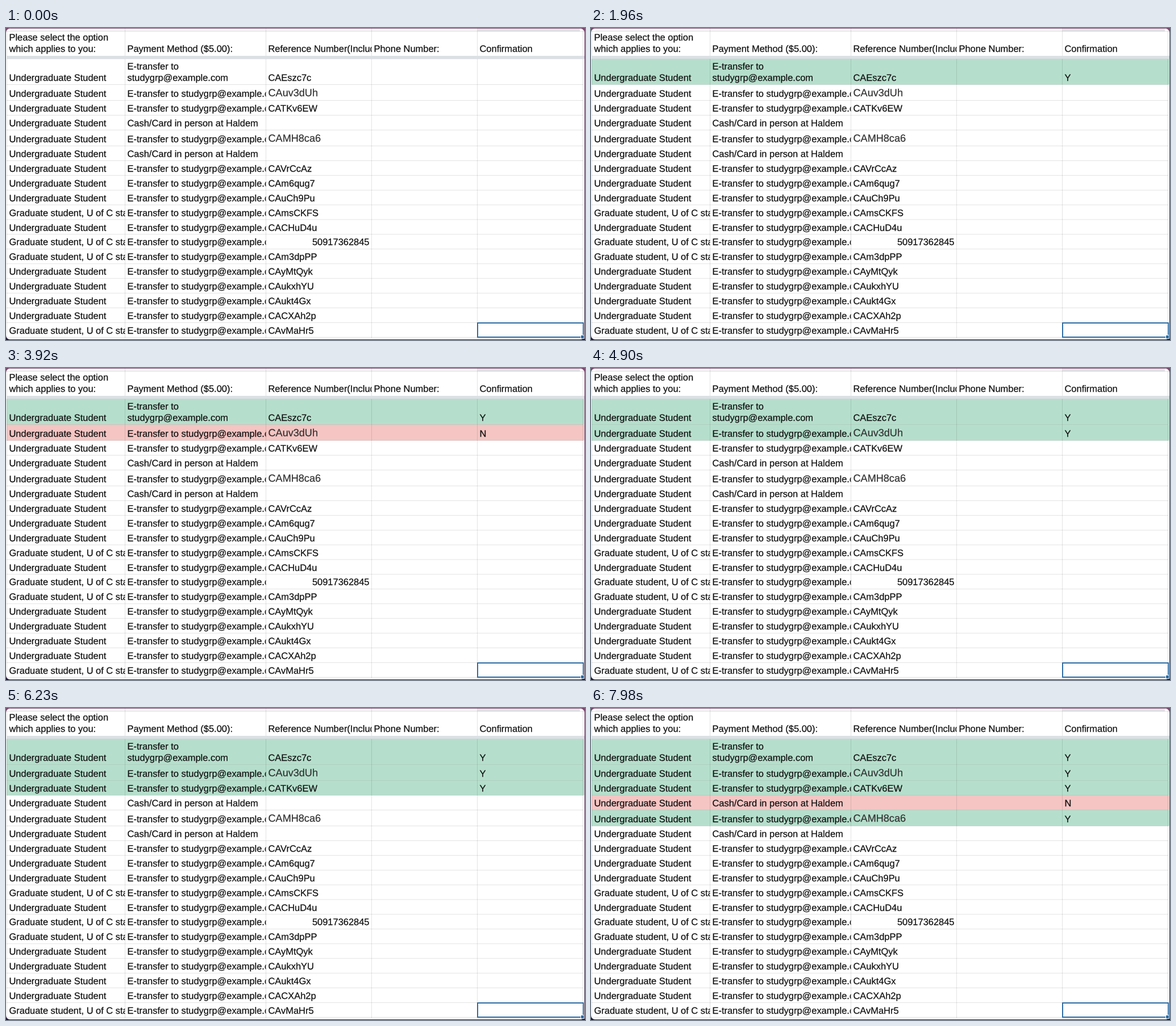
An HTML page that plays this animation: 1019 by 549 pixels, repeating every 8 s.

```html
<!DOCTYPE html>
<html lang="en">
<head>
<meta charset="utf-8">
<title>Payment sheet</title>
<style>
  html, body { margin: 0; width: 100%; height: 100%; overflow: hidden; background: #fff; }
  svg { display: block; }
  text {
    font: 16.45px "Liberation Sans", Arial, sans-serif;
    text-rendering: geometricPrecision;
    fill: #111;
    stroke: #111;
    stroke-width: .25px;
    white-space: pre;
  }
  .big { font-size: 18.1px; fill: #333; stroke: #333; }
</style>
</head>
<body>
<svg id="stage" width="1019" height="549" viewBox="0 0 1019 549"></svg>
<script>
const LOOP = 8000;
const PINK = '#f4c5c3', GREEN = '#b5dfcc', BLUE = '#2d6ba3';
const cols = [1.5, 209.5, 457.5, 643.5, 829.5, 1015.5];
const tops = [54, 99.5, 127.5, 153.5, 179.5, 207.5];
for (let i = 0; i <= 12; i++) tops.push(233.5 + i * 25.9);

const mail = 'studygrp@example.com';
const refs = ['CAEszc7c', 'CAuv3dUh', 'CATKv6EW', '', 'CAMH8ca6', '', 'CAVrCcAz', 'CAm6qug7', 'CAuCh9Pu',
  'CAmsCKFS', 'CACHuD4u', '50917362845', 'CAm3dpPP', 'CAyMtQyk', 'CAukxhYU', 'CAukt4Gx', 'CACXAh2p', 'CAvMaHr5'];
const graduates = [9, 11, 12, 17];
const bigRefs = [1, 4];

// [time, row, answer]
const answers = [
  [1120, 0, 'N'], [1750, 0, 'Y'], [2940, 1, 'N'], [4060, 1, 'Y'],
  [5390, 2, 'N'], [6020, 2, 'Y'], [6720, 3, 'N'], [7840, 4, 'Y']
];

const rect = (x, y, w, h, fill, more = '') =>
  `<rect x="${x}" y="${y}" width="${w}" height="${h}" fill="${fill}" ${more}/>`;
const path = (d, stroke, more = '') => `<path d="${d}" fill="none" stroke="${stroke}" ${more}/>`;

// Text in a cell, cut off at the right edge of its column
function cell(col, y, text, attrs = '') {
  const x = cols[col], w = cols[col + 1] - x;
  return `<svg x="${x}" y="0" width="${w}" height="549"><text x="4" y="${y}" ${attrs}>${text}</text></svg>`;
}

function header() {
  return cell(0, 22.2, 'Please select the option') + cell(0, 42.2, 'which applies to you:') +
    ['Payment Method ($5.00):', 'Reference Number(Include', 'Phone Number:', 'Confirmation']
      .map((title, i) => cell(i + 1, 42.2, title)).join('');
}

function row(ref, i) {
  const y = tops[i + 1] - 6.5;
  const who = graduates.includes(i) ? 'Graduate student, U of C staff' : 'Undergraduate Student';
  let pay = cell(1, y, ref ? 'E-transfer to ' + mail : 'Cash/Card in person at Haldem');
  if (i === 0) pay = cell(1, y - 20, 'E-transfer to') + cell(1, y, mail);
  const number = /^\d+$/.test(ref);
  const code = number
    ? `<text x="639.5" y="${y}" text-anchor="end">${ref}</text>`
    : bigRefs.includes(i) ? cell(2, y - 1, ref, 'class="big"') : cell(2, y, ref);
  return cell(0, y, who) + pay + code + cell(4, y, '', `id="mark${i}"`);
}

const fillRow = i => rect(1, tops[i], 1016.5, tops[i + 1] - tops[i], 'none', `id="fill${i}"`);

const lines = tops.map(y => `M1 ${y}H1016`).join('') + cols.map(x => `M${x} 1V547`).join('');
const stage = document.getElementById('stage');
stage.innerHTML = `
  <linearGradient id="desk" x2="0" y2="1">
    <stop stop-color="#7d4a70"/><stop offset="1" stop-color="#201634"/>
  </linearGradient>` +
  rect(0, 0, 1019, 549, 'url(#desk)') +
  rect(0, 1, 1018, 547, '#fff', 'rx="7"') +
  rect(8, 1, 1002, 5, '#f6f6f6') + rect(830, 1, 180, 5, '#e2e4e7') +
  [0, 1, 2, 3, 4].map(fillRow).join('') +
  path('M1 6H1016' + lines, '#000', 'stroke-opacity=".11"') +
  rect(1, 49, 1017, 5.5, '#dbe0e4') +
  header() + refs.map(row).join('') +
  path('M830 519H1016V544H830Z', BLUE, 'stroke-width="2"') +
  rect(1011.5, 540.5, 6, 6, BLUE, 'stroke="#fff"');

const fills = [], marks = [];
for (let i = 0; i < 5; i++) {
  fills.push(document.getElementById('fill' + i));
  marks.push(document.getElementById('mark' + i));
}

function draw(now) {
  const t = now % LOOP;
  const state = ['', '', '', '', ''];
  for (const [time, i, answer] of answers) if (t >= time) state[i] = answer;
  state.forEach((answer, i) => {
    fills[i].setAttribute('visibility', answer ? 'visible' : 'hidden');
    fills[i].setAttribute('fill', answer === 'Y' ? GREEN : PINK);
    marks[i].textContent = answer;
  });
  requestAnimationFrame(draw);
}
draw(performance.now());
</script>
</body>
</html>
```
